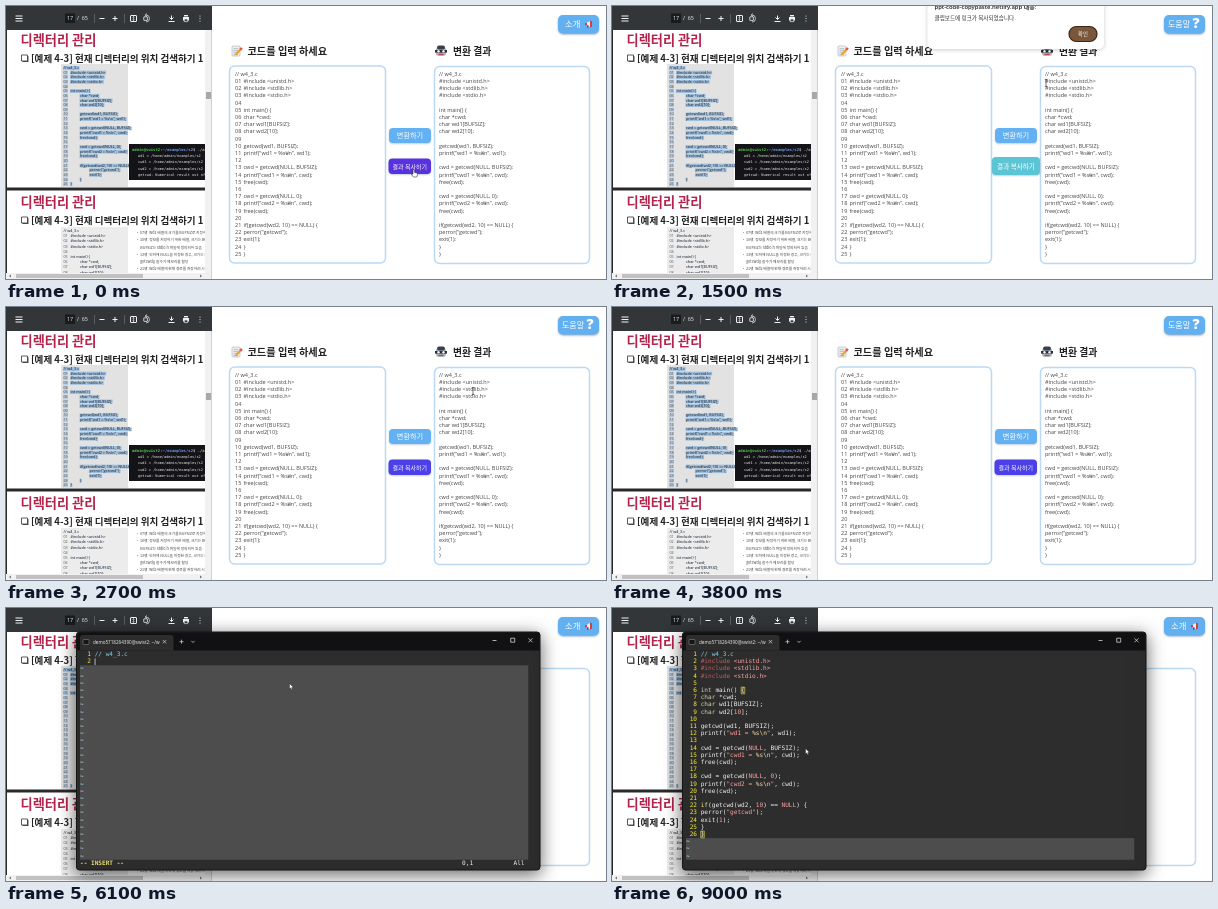
An HTML page with a canvas for the animation above (9.1 s loop, 600 by 273 pixels).

```html
<!DOCTYPE html>
<html lang="ko">
<head>
<meta charset="utf-8">
<style>
  html, body { margin: 0; width: 100%; height: 100%; overflow: hidden; background: #fff; }
  canvas { display: block; width: 600px; height: 273px; }
</style>
</head>
<body>
<canvas id="stage"></canvas>
<script>
const LOOP = 9100;
const TIME = {
  press: 300, alert: 500, help: 900, dismiss: 2200, terminal: 4100,
  intro: 5900, firstLine: 6050, pasted: 6200, escape: 8000
};
const canvas = document.getElementById('stage');
const ratio = window.devicePixelRatio || 1;
canvas.width = 600 * ratio;
canvas.height = 273 * ratio;
const ctx = canvas.getContext('2d');

const KOREAN = '"Noto Sans CJK KR", "Noto Sans CJK", sans-serif';
const SANS = '"Open Sans", "Noto Sans CJK KR", sans-serif';
const MONO = '"DejaVu Sans Mono", monospace';

const CODE = `// w4_3.c
#include <unistd.h>
#include <stdlib.h>
#include <stdio.h>

int main() {
char *cwd;
char wd1[BUFSIZ];
char wd2[10];

getcwd(wd1, BUFSIZ);
printf("wd1 = %s\\n", wd1);

cwd = getcwd(NULL, BUFSIZ);
printf("cwd1 = %s\\n", cwd);
free(cwd);

cwd = getcwd(NULL, 0);
printf("cwd2 = %s\\n", cwd);
free(cwd);

if(getcwd(wd2, 10) == NULL) {
perror("getcwd");
exit(1);
}
}`.split('\n');
const WEB_CODE = CODE.map(line => line.replace('\\', '₩'));
const number = i => i ? String(i).padStart(2, '0') : '';

// ---------- drawing helpers ----------
function rect(x, y, w, h, fill) {
  ctx.fillStyle = fill;
  ctx.fillRect(x, y, w, h);
}

function box(x, y, w, h, r, fill, stroke, weight = 1) {
  ctx.beginPath();
  ctx.roundRect(x, y, w, h, r);
  if (fill) { ctx.fillStyle = fill; ctx.fill(); }
  if (stroke) { ctx.strokeStyle = stroke; ctx.lineWidth = weight; ctx.stroke(); }
}

function text(str, x, y, size, color, family = SANS, weight = 400, align = 'left') {
  ctx.font = `${weight} ${size}px ${family}`;
  ctx.textBaseline = 'middle';
  ctx.textAlign = align;
  ctx.fillStyle = color;
  ctx.fillText(str, x, y);
}

function shape(d, x, y, fill, stroke, weight = 1) {
  const path = new Path2D(d);
  ctx.save();
  ctx.translate(x, y);
  if (fill) { ctx.fillStyle = fill; ctx.fill(path); }
  if (stroke) { ctx.strokeStyle = stroke; ctx.lineWidth = weight; ctx.stroke(path); }
  ctx.restore();
}

function withShadow(color, blur, dy, draw) {
  ctx.save();
  ctx.shadowColor = color;
  ctx.shadowBlur = blur * ratio;
  ctx.shadowOffsetY = dy * ratio;
  draw();
  ctx.restore();
}

function clipped(x, y, w, h, draw) {
  ctx.save();
  ctx.beginPath();
  ctx.rect(x, y, w, h);
  ctx.clip();
  draw();
  ctx.restore();
}

// ---------- PDF viewer ----------
function slideCode(top, step, selected) {
  let indent = 0;
  CODE.forEach((line, i) => {
    const y = top + i * step;
    if (line.startsWith('}')) indent--;
    const x = i ? 64.5 + indent * 9.5 : 57.5;
    ctx.font = `600 3.7px ${SANS}`;
    if (selected) {
      if (i) rect(57, y - 2, 5, 3.8, '#b4c8dc');
      if (line) rect(x - 0.5, y - 2, ctx.measureText(line).width + 1, 3.8, '#9fbedc');
    }
    text(number(i), 57.5, y, 3.7, '#555');
    text(line, x, y, 3.7, '#35424f', SANS, 600);
    if (line.endsWith('{')) indent++;
  });
}

function slideHead(y) {
  text('디렉터리 관리', 14.6, y, 13.2, '#b3234b', KOREAN, 700);
  rect(16.5, y + 16, 6, 6, '#555');
  box(15.5, y + 15, 6, 6, 0, '#fff', '#333', 0.8);
  text('[예제 4-3] 현재 디렉터리의 위치 검색하기 1', 25, y + 18, 9.55, '#222', KOREAN, 700);
}

function slideShell() {
  rect(123, 138, 76, 43, '#fff');
  rect(123, 138, 76, 36, '#141418');
  text('admin@swist2', 126, 143.5, 3.9, '#55c34c', MONO, 700);
  text(':~/examples/s2', 154.2, 143.5, 3.9, '#6c9be8', MONO, 700);
  text('$ ./a.out', 187, 143.5, 3.9, '#eee', MONO);
  ['wd1 = /home/admin/examples/s2', 'cwd1 = /home/admin/examples/s2',
   'cwd2 = /home/admin/examples/s2', 'getcwd: Numerical result out of range']
    .forEach((line, i) => text(line, 132, 150 + i * 6.3, 3.6, '#e4e4e4', MONO));
}

function toolbar() {
  rect(0, 0, 206, 24, '#323639');
  const ink = '#f1f1f1';
  for (const y of [10, 12.5, 15]) rect(9.5, y - 0.5, 7, 1, ink);
  rect(59, 7.5, 10, 9.5, '#191b1c');
  text('17', 64, 12.5, 5.4, ink, SANS, 400, 'center');
  text('/  65', 71, 12.5, 5.4, ink);
  rect(88, 8, 0.6, 9, '#777');
  rect(93.5, 12, 5, 1, ink);
  rect(106.5, 12, 5, 1, ink);
  rect(108.5, 10, 1, 5, ink);
  rect(118, 8, 0.6, 9, '#777');
  box(124.5, 9.5, 6, 6, 0.5, null, ink);
  shape('M0-2V2M-1-1L0-2L1-1M-1 1L0 2L1 1', 127.5, 12.5, null, ink, 0.6);
  box(137.8, 10.8, 3.6, 3.6, 0.3, null, ink, 0.8);
  shape('M0-3.5A3.5 3.5 0 0 1 0 3.5M1-5L-1-3.5L1-2', 140, 12.5, null, ink, 0.7);
  shape('M0-3V1M-2-1L0 1L2-1M-3 3H3', 165.5, 12.5, null, ink, 1);
  rect(177, 11, 6, 3.5, ink);
  rect(178, 9, 4, 1.4, ink);
  box(178.3, 13, 3.4, 2.6, 0, '#323639', ink, 0.7);
  for (const y of [10, 12.5, 15]) box(193.4, y - 0.6, 1.2, 1.2, 0.6, ink);
}

function pdfViewer() {
  clipped(0, 0, 199, 267, () => {
    rect(0, 24, 199, 243, '#28292b');
    rect(1, 24, 198, 157.5, '#fff');
    rect(1, 184.5, 198, 83, '#fff');
    slideHead(34);
    rect(55, 58, 67, 123, '#e2e2e2');
    clipped(0, 24, 199, 157.5, () => { slideCode(62, 4.65, true); slideShell(); });
    slideHead(196);
    rect(55, 221, 67, 46, '#ececec');
    slideCode(225, 5.2, false);
    ['•  07행: wd1 배열의 크기를 BUFSIZ로 지정하고 선언',
     '•  10행: 정보를 저장하기 위한 배열, 크기는 BUFSIZ',
     '    BUFSIZ는 stdio.h 파일에 정의되어 있음',
     '•  13행: 인자에 NULL을 지정한 경우, 크기는 BUFSIZ',
     '    getcwd() 함수가 메모리를 할당',
     '•  21행: wd2 배열에 현재 경로를 저장하려 시도함'
    ].forEach((line, i) => text(line, 131, 227 + i * 7.1, 3.7, '#444', KOREAN));
  });
  toolbar();
  rect(199, 24, 7, 249, '#f1f1f1');
  rect(200, 86, 5, 7, '#a8a8a8');
  rect(0, 267, 206, 6, '#f1f1f1');
  rect(10, 268, 127, 4, '#c1c1c1');
  shape('M1-1.5L-1 0L1 1.5Z', 4, 270, '#777');
  shape('M-1-1.5L1 0L-1 1.5Z', 195, 270, '#777');
  rect(205.4, 24, 0.6, 249, '#bbb');
}

// ---------- web page ----------
function memoIcon() {
  box(226, 40, 8, 10, 1, '#eef0f2', '#a9b2ba', 0.6);
  for (let y = 42.5; y < 49; y += 2) rect(227.5, y, 4.5, 0.6, '#8e9aa6');
  shape('M0 0L6-7L8-5.5L2 1Z', 228.5, 48.5, '#e8a53a');
  shape('M0 0L1.6-1.8L3.4-0.4L1.8 1.4Z', 233.3, 43, '#e0524f');
}

function robotIcon() {
  box(430, 41, 10, 9, 3, '#a9b4bb');
  box(431, 39.5, 8, 4, 2, '#3a3f4c');
  rect(429, 44, 12, 2.6, '#2b2d36');
  box(431.3, 44, 2.4, 2.4, 1.2, '#f0f4f8');
  box(436.3, 44, 2.4, 2.4, 1.2, '#f0f4f8');
  rect(432.5, 47.8, 5, 1.2, '#c4424a');
}

function button(label, x, y, w, h, size, fill) {
  withShadow('rgba(60,90,140,.3)', 2, 1, () => box(x, y, w, h, 4, fill));
  text(label, x + w / 2, y + h / 2 + 0.2, size, '#fff', KOREAN, 500, 'center');
}

function helpButton(t) {
  withShadow('rgba(30,80,140,.5)', 2, 1, () => box(552, 9, 41, 18.5, 5, '#62b0f0'));
  if (t >= TIME.help && t < TIME.intro) {
    text('도움말', 556, 18.3, 8, '#fff', KOREAN, 500);
    text('?', 584, 18.3, 14, '#fff', SANS, 800, 'center');
  } else {
    text('소개', 559, 18.3, 8.4, '#fff', KOREAN, 500);
    shape('M-3.2-0.8L1-3V3L-3.2 1.2Z', 583, 18, '#e9eef5');
    shape('M1-3.6L3-2.8V2.8L1 3.6Z', 583, 18, '#d5403f');
    rect(579, 17, 2, 2.4, '#d5403f');
    rect(581, 19.2, 1.5, 2.5, '#4b5b78');
  }
}

function webPage(t) {
  memoIcon();
  text('코드를 입력 하세요', 241.5, 45, 10.2, '#222', KOREAN, 700);
  robotIcon();
  text('변환 결과', 447, 45, 9.8, '#222', KOREAN, 700);
  box(223.5, 60, 156, 197, 5, '#fff', '#bcd9f3', 1.5);
  box(428.5, 60.5, 155, 197, 5, '#fff', '#bcd9f3', 1.5);
  WEB_CODE.forEach((line, i) => {
    const y = 68.3 + i * 7.2;
    text(number(i), 229, y, 5.5, '#444');
    text(line, i ? 237.5 : 229, y, 5.5, '#444');
    text(line, 433, y, 5.5, '#444');
  });
  button('변환하기', 383, 122, 42, 15, 7.2, '#63b1f2');
  if (t >= TIME.press && t < TIME.dismiss) button('결과 복사하기', 380, 151, 48, 18, 6.6, '#5bc5d6');
  else button('결과 복사하기', 382.5, 152.5, 42.5, 15.5, 6, t < TIME.press ? '#5832de' : '#4b3fe8');
  helpButton(t);
}

function alertBox() {
  withShadow('rgba(0,0,0,.2)', 4, 1, () => box(315.5, -8, 176.5, 51, 5, '#fff'));
  text('ppt-code-copypaste.netlify.app 내용:', 322.5, 1, 5.9, '#222', SANS, 600);
  text('클립보드에 링크가 복사되었습니다.', 322.5, 11.5, 5.6, '#333', KOREAN);
  box(457, 20.5, 28, 15, 7.5, '#7a573b', '#3a2414', 1.2);
  text('확인', 471, 28.2, 5.4, '#fff', KOREAN, 400, 'center');
}

// ---------- terminal ----------
const CELL = 3.674, ROW = 7.2, LEFT = 74, TOP = 42.9;
const colX = col => LEFT + col * CELL;
const rowY = row => TOP + (row - 0.5) * ROW;
const mono = (str, col, row, color, weight) => text(str, colX(col), rowY(row), 6.1, color, MONO, weight);

const RULES = [
  [/^\/\/.*/, '#87ceeb'], [/^#include/, '#cd5c5c'],
  [/^(<\w+\.h>|NULL|\d+)/, '#ffa0a0'], [/^(%s|\\n)/, '#ffdead'],
  [/^"/, '#ffa0a0'], [/^(int|char)\b/, '#d6d2a6'], [/^if\b/, '#f0e68c'],
  [/^(\w+|\s+|.)/, '#f2f2f2']
];

function codeRow(line, row) {
  let col = 4, quoted = false;
  while (line) {
    const [pattern, color] = RULES.find(([p]) => p.test(line));
    const token = line.match(pattern)[0];
    if (token === '"') quoted = !quoted;
    mono(token, col, row, quoted && color === '#f2f2f2' ? '#ffa0a0' : color);
    col += token.length;
    line = line.slice(token.length);
  }
}

function braceMark(col, row) {
  box(colX(col), rowY(row) - 3.4, CELL, 6.8, 0, '#55542a', '#d8d25a', 0.6);
}

function windowFrame() {
  withShadow('rgba(0,0,0,.6)', 17, 4, () => box(70.5, 24, 463.5, 238, 3, '#2d2d2d', '#151515', 1));
  box(71, 24.5, 462.5, 18, [3, 3, 0, 0], '#111113');
  box(74, 27, 93.5, 15.5, [3, 3, 0, 0], '#2d2d2d');
  box(77, 31.5, 6, 5, 0.8, '#161616', '#999', 0.5);
  text('demo5718264390@swist2: ~/w', 87, 34.3, 4.6, '#f0f0f0');
  shape('M-1.7-1.7L1.7 1.7M1.7-1.7L-1.7 1.7', 158.5, 33.7, null, '#ddd', 0.7);
  shape('M-2 0H2M0-2V2', 175.5, 33.7, null, '#ddd', 0.7);
  shape('M-1.6-0.8L0 0.8L1.6-0.8', 187, 33.7, null, '#ddd', 0.7);
  shape('M-2 0H2', 488.5, 32.5, null, '#eee', 0.7);
  box(504.7, 30.2, 4, 4, 0, null, '#eee', 0.7);
  shape('M-2-2L2 2M2-2L-2 2', 524.5, 32.3, null, '#eee', 0.7);
}

function vim(t) {
  const count = t < TIME.firstLine ? 1 : t < TIME.pasted ? 2 : 26;
  const filled = count === 26;
  const inserting = t < TIME.escape;
  rect(LEFT, TOP + count * ROW, 122 * CELL, (29 - count) * ROW, '#4d4d4d');
  if (filled) {
    braceMark(15, 6);
    braceMark(4, 26);
  }
  for (let row = 1; row <= 29; row++) {
    if (row > count) { mono('~', 0, row, '#add8e6', 700); continue; }
    mono(String(row).padStart(3), 0, row, '#f4ee3c');
    if (filled || row < count) codeRow(CODE[row - 1], row);
  }
  if (inserting) {
    rect(colX(filled ? 5 : 4), rowY(count) - 3.3, 0.7, 6.6, '#f2f2f2');
    mono('-- INSERT --', 0, 30, '#e6dc7a', 700);
    mono(filled ? '26,2' : '0,1', 104, 30, '#f2f2f2');
    mono('All', 118, 30, '#f2f2f2');
  }
}

// ---------- pointer ----------
const arrow = (x, y) => shape('M0 0V5.6L1.3 4.4L2.2 6.3L3.1 5.9L2.2 4.1H4Z', x, y, '#fff', '#111', 0.4);
const hand = (x, y) => shape('M0 0Q1-1 1.6 0V2.4L4.4 3V5.2L3.6 7H0.4L-1.6 4.2L0 4Z', x, y, '#fff', '#111', 0.5);
const beam = (x, y) => shape('M-1.2-3.5H1.2M0-3.5V3.5M-1.2 3.5H1.2', x, y, null, '#222', 0.6);

// Stops of the pointer: time, x, y. It leaves through the bottom edge.
const PAGE_PATH = [[900, 407, 164], [1500, 434, 77], [1900, 470, 29], [2300, 470, 29],
                   [2700, 467, 84], [3100, 467, 84], [3800, 450, 280]];
const TERMINAL_PATH = [[7000, 283.5, 75.5], [7500, 193.5, 140.5]];

function along(path, t) {
  const next = path.findIndex(([time]) => time > t);
  if (next < 1) return path.at(next).slice(1);
  const [t0, x0, y0] = path[next - 1], [t1, x1, y1] = path[next];
  const p = (t - t0) / (t1 - t0), ease = p * p * (3 - 2 * p);
  return [x0 + (x1 - x0) * ease, y0 + (y1 - y0) * ease];
}

function pointer(t) {
  if (t < TIME.terminal) {
    const [x, y] = along(PAGE_PATH, t);
    const overText = x > 430 && y > 60 && y < 257;
    (t < 900 ? hand : overText ? beam : arrow)(x, y);
  } else if (t >= 5300) {
    arrow(...along(TERMINAL_PATH, t));
  }
}

function draw(t) {
  ctx.setTransform(ratio, 0, 0, ratio, 0, 0);
  rect(0, 0, 600, 273, '#fff');
  pdfViewer();
  webPage(t);
  if (t >= TIME.alert && t < TIME.dismiss) alertBox();
  if (t >= TIME.terminal) {
    windowFrame();
    vim(t);
  }
  pointer(t);
}

function frame() {
  draw(performance.now() % LOOP);
  requestAnimationFrame(frame);
}
frame();
</script>
</body>
</html>
```
